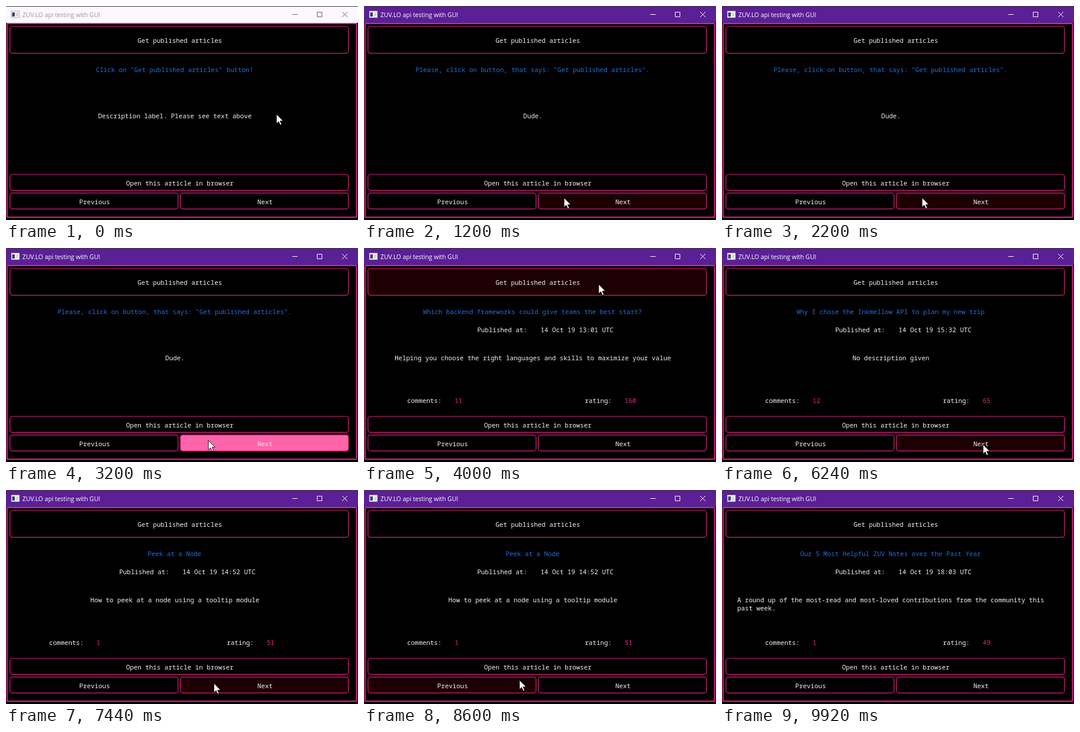
Animation, 600 px wide and 366 px high, one loop 10 s. Source, as an HTML page:

```html
<!DOCTYPE html>
<html lang="en">
<head>
<meta charset="utf-8">
<title>ZUV.LO api testing with GUI</title>
<style>
  html, body { margin: 0; width: 100%; height: 100%; overflow: hidden; background: #000; }
  svg { display: block; }
  text { font: 10.92px "Noto Sans Mono", monospace; fill: #f4f4f4; white-space: pre; }
  .mid { text-anchor: middle; }
  .btn rect { fill: #000; stroke: #de1f80; stroke-width: 1.2; }
  .btn.hover rect { fill: #1c0002; }
  .btn.down rect { fill: #ff64a8; }
  .btn.down text { fill: #ffe3f0; }
  .value { fill: #e6278c; }
  #head { fill: #1f6fe0; }
  #bar { fill: #fdf8fd; }
  #caption { font: 10.4px "Open Sans", sans-serif; fill: #999; }
  #controls { fill: none; stroke: #666; }
  .active #bar { fill: #5b1f96; }
  .active #caption { fill: #fff; }
  .active #controls { stroke: #fff; }
</style>
</head>
<body>
<svg id="win" width="600" height="366" viewBox="0 0 600 366">
  <rect width="600" height="366"/>
  <rect id="bar" y="1" width="600" height="28"/>
  <path d="M0 .5H600" stroke="#3b3340"/>
  <g id="icon">
    <rect x="9" y="8.5" width="14" height="11.5" fill="#f2f2f2" stroke="#8a8a94" stroke-width=".6"/>
    <path d="M10.5 11h4.5v7h-4.5z" fill="#33465c"/>
    <path d="M17 12.5h4M17 14.5h4M17 16.5h4" stroke="#b9b9c2"/>
  </g>
  <text id="caption" x="28" y="18.5">ZUV.LO api testing with GUI</text>
  <path id="controls" d="M488 14.5h9M530.5 10.5h8v8h-8zM573 10l9 9m0-9l-9 9"/>
  <rect x="1.8" y="30" width="595.8" height="331.3" rx="1" fill="none" stroke="#ed1c8e" stroke-width="2"/>
  <g id="buttons"></g>
  <text id="head" class="mid" x="287.3" y="113"></text>
  <text id="body" x="26" y="191.5"></text>
  <text id="more" x="26" y="205.5"></text>
  <g id="info">
    <text x="193" y="144">Published at:</text>
    <text id="date" x="301" y="144"></text>
    <text x="73.5" y="265">comments:</text>
    <text id="comments" class="value" x="154.5" y="265"></text>
    <text x="376.5" y="265">rating:</text>
    <text id="rating" class="value" x="444.5" y="265"></text>
  </g>
  <path id="cursor" d="M0 0V16.2l3.8-3.5 2.6 6 2.5-1.1-2.6-5.8h5.2z" fill="#fff" stroke="#000" stroke-width=".9"/>
</svg>
<script>
const LOOP = 10000;
const $ = id => document.getElementById(id);

// label, x, y, width, height
const buttons = [
  ["Get published articles", 6.8, 35, 577, 45.8],
  ["Open this article in browser", 6.8, 288, 577, 27.3],
  ["Previous", 6.8, 319.8, 286.5, 27.3],
  ["Next", 297.3, 319.8, 286.5, 27.3],
].map(([label, x, y, w, h]) => {
  const el = document.createElementNS("http://www.w3.org/2000/svg", "g");
  el.innerHTML = `<rect x="${x}" y="${y}" width="${w}" height="${h}" rx="4"/>
    <text class="mid" x="${x + w / 2 + 1}" y="${y + h / 2 + 5.5}">${label}</text>`;
  $("buttons").append(el);
  return { el, has: (px, py) => px >= x && px <= x + w && py >= y && py <= y + h };
});

const page = (head, body, date = "", comments = "", rating = "", more = "") =>
  ({ head, body, date, comments, rating, more });

const hello = page('Click on "Get published articles" button!', "Description label. Please see text above");
const nag = page('Please, click on button, that says: "Get published articles".', "Dude.");
const frameworks = page("Which backend frameworks could give teams the best start?",
  "Helping you choose the right languages and skills to maximize your value", "14 Oct 19 13:01 UTC", 11, 160);
const trip = page("Why I chose the Inkmellow API to plan my new trip",
  "No description given", "14 Oct 19 15:32 UTC", 12, 65);
const node = page("Peek at a Node",
  "How to peek at a node using a tooltip module", "14 Oct 19 14:52 UTC", 1, 51);
const roundup = page("Our 5 Most Helpful ZUV Notes over the Past Year",
  "A round up of the most-read and most-loved contributions from the community this",
  "14 Oct 19 18:03 UTC", 1, 49, "past week.");

const pages = [[0, hello], [1120, nag], [4000, frameworks], [5200, trip],
  [6700, roundup], [7100, node], [8800, roundup]];

const presses = [[960, 1120], [1480, 1600], [2440, 2560], [2800, 2920], [3120, 3280],
  [3840, 4000], [4840, 5200], [6560, 6700], [6960, 7100], [8680, 8800]];

// time, x, y of the pointer tip
const path = [[0, 461, 185], [80, 461, 185], [900, 341, 328], [2240, 341, 328], [3120, 345, 329],
  [3300, 345, 329], [3760, 400, 62], [4160, 400, 62], [4720, 445, 336], [7240, 445, 336],
  [7640, 265, 325], [9000, 265, 325], [9520, 252, 372], [LOOP, 252, 372]];

function pointer(t) {
  const i = path.findIndex(p => p[0] > t);
  const [t0, x0, y0] = path[i - 1], [t1, x1, y1] = path[i];
  const u = (t - t0) / (t1 - t0), k = u * u * (3 - 2 * u);
  return [x0 + (x1 - x0) * k, y0 + (y1 - y0) * k];
}

let shown;
function show(p) {
  if (p === shown) return;
  shown = p;
  for (const id in p) $(id).textContent = p[id];
  $("body").setAttribute("x", 288 - p.body.length * 3.276);
  $("info").style.display = p.date ? "" : "none";
}

function draw(t) {
  const [x, y] = pointer(t);
  const down = presses.some(([a, b]) => t >= a && t < b);
  $("win").classList.toggle("active", t >= 960);
  for (const b of buttons)
    b.el.setAttribute("class", "btn" + (b.has(x, y) ? (down ? " down" : " hover") : ""));
  show(pages.findLast(p => p[0] <= t)[1]);
  $("cursor").setAttribute("transform", `translate(${x} ${y})`);
}

const start = performance.now();
function tick() {
  draw((performance.now() - start) % LOOP);
  requestAnimationFrame(tick);
}
tick();
</script>
</body>
</html>
```
